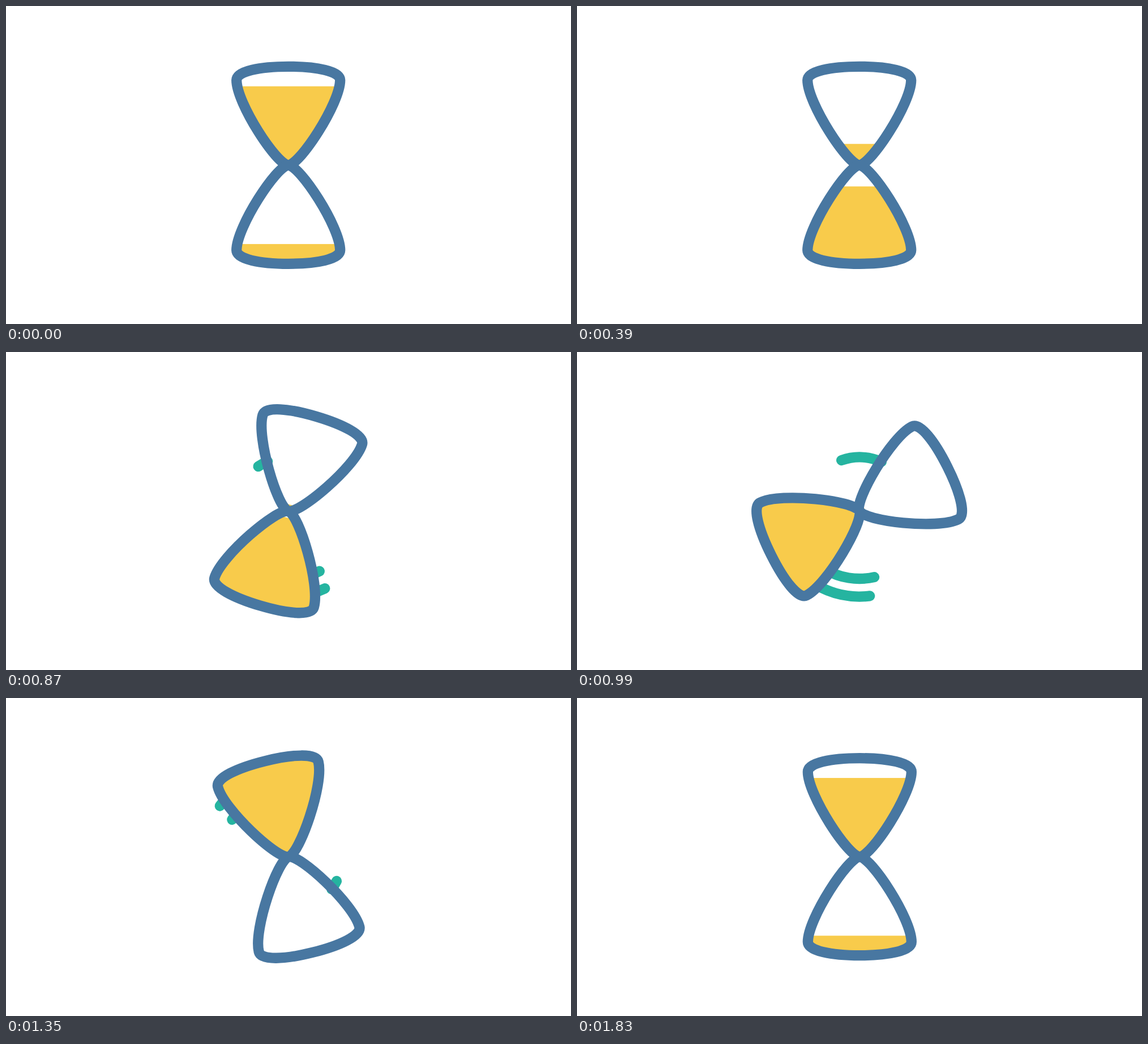
Write an HTML page that moves like this. It is 998x561 px and loops after 1.86 s.

```html
<!DOCTYPE html>
<html lang="en">
<head>
<meta charset="utf-8">
<title>Hourglass loader</title>
<style>
  html, body { margin: 0; width: 100%; height: 100%; overflow: hidden; background: #fff; }
  svg { display: block; width: 100vw; height: 100vh; }
  .trail { fill: none; stroke: #25b4a0; stroke-width: 18.3; stroke-linecap: round; }
  .sand { fill: #f8cb4b; }
  .glass { fill: none; stroke: #4877a1; stroke-width: 18.3; }
</style>
</head>
<body>
<svg viewBox="0 0 998 561">
  <defs>
    <path id="bulb" d="M0-174C-50-174-91.5-166-91.5-150C-91.5-109-20 0 0 0C20 0 91.5-109 91.5-150C91.5-166 50-174 0-174Z"/>
    <clipPath id="inside"><use href="#bulb"/></clipPath>
  </defs>
  <g id="spin">
    <path class="trail"/>
    <path class="trail"/>
    <path class="trail"/>
    <g transform="translate(-.3 .3)">
      <g clip-path="url(#inside)"><rect id="topSand" class="sand" x="-100" width="200"/></g>
      <g clip-path="url(#inside)" transform="scale(1 -1)"><rect id="lowSand" class="sand" x="-100" width="200"/></g>
      <use href="#bulb" class="glass"/>
      <use href="#bulb" class="glass" transform="scale(1 -1)"/>
    </g>
  </g>
</svg>
<script>
const LOOP = 1860, STEP = 30, CYCLE = LOOP - STEP;
const TURN_START = 580, SAND_RESET = 1190;

const trails = [
  { r: 95, head: -129.3, lag: 103 },
  { r: 119.5, head: 57.5, lag: 102 },
  { r: 151, head: 58, lag: 80 }
];
const trailEls = document.querySelectorAll('.trail');
const byId = id => document.getElementById(id);
const spin = byId('spin'), topSand = byId('topSand'), lowSand = byId('lowSand');

// Ease in and out: cubic bezier (x1, 0, x2, 1), solved by bisection.
function ease(x1, x2, t) {
  if (t <= 0) return 0;
  if (t >= 1) return 1;
  let lo = 0, hi = 1;
  for (let i = 0; i < 30; i++) {
    const s = (lo + hi) / 2, u = 1 - s;
    if (3 * u * u * s * x1 + 3 * u * s * s * x2 + s * s * s < t) lo = s; else hi = s;
  }
  return lo * lo * (3 - 2 * lo);
}

const turn = t => 180 * ease(.607, .006, (t - TURN_START) / (CYCLE - TURN_START));

function sandLevel(t) {
  const age = (t - SAND_RESET + CYCLE) % CYCLE;
  return 168 - 159 * ease(.71, .14, age / CYCLE);
}

// Sand between two distances from the neck of a bulb.
function fill(rect, near, far) {
  rect.setAttribute('y', -far);
  rect.setAttribute('height', far - near);
}

function polar(r, deg) {
  const a = deg * Math.PI / 180;
  return (r * Math.cos(a)).toFixed(2) + ' ' + (r * Math.sin(a)).toFixed(2);
}

function draw(t) {
  const angle = turn(t), level = sandLevel(t);
  spin.setAttribute('transform', `translate(499 280.5) rotate(${angle})`);

  const [emptying, filling] = t < SAND_RESET ? [topSand, lowSand] : [lowSand, topSand];
  fill(emptying, 0, level);
  fill(filling, level, 200);

  // Each trail reaches back to where its head was a moment ago.
  trails.forEach(({ r, head, lag }, i) => {
    const len = angle - turn(t - lag);
    const shown = len > 1.5;
    trailEls[i].setAttribute('d', shown
      ? `M${polar(r, head - len)}A${r} ${r} 0 0 1 ${polar(r, head)}` : '');
  });
}

const start = performance.now();
function tick() {
  const t = (performance.now() - start) % LOOP;
  draw(Math.floor(t / STEP) * STEP);
  requestAnimationFrame(tick);
}
tick();
</script>
</body>
</html>
```
